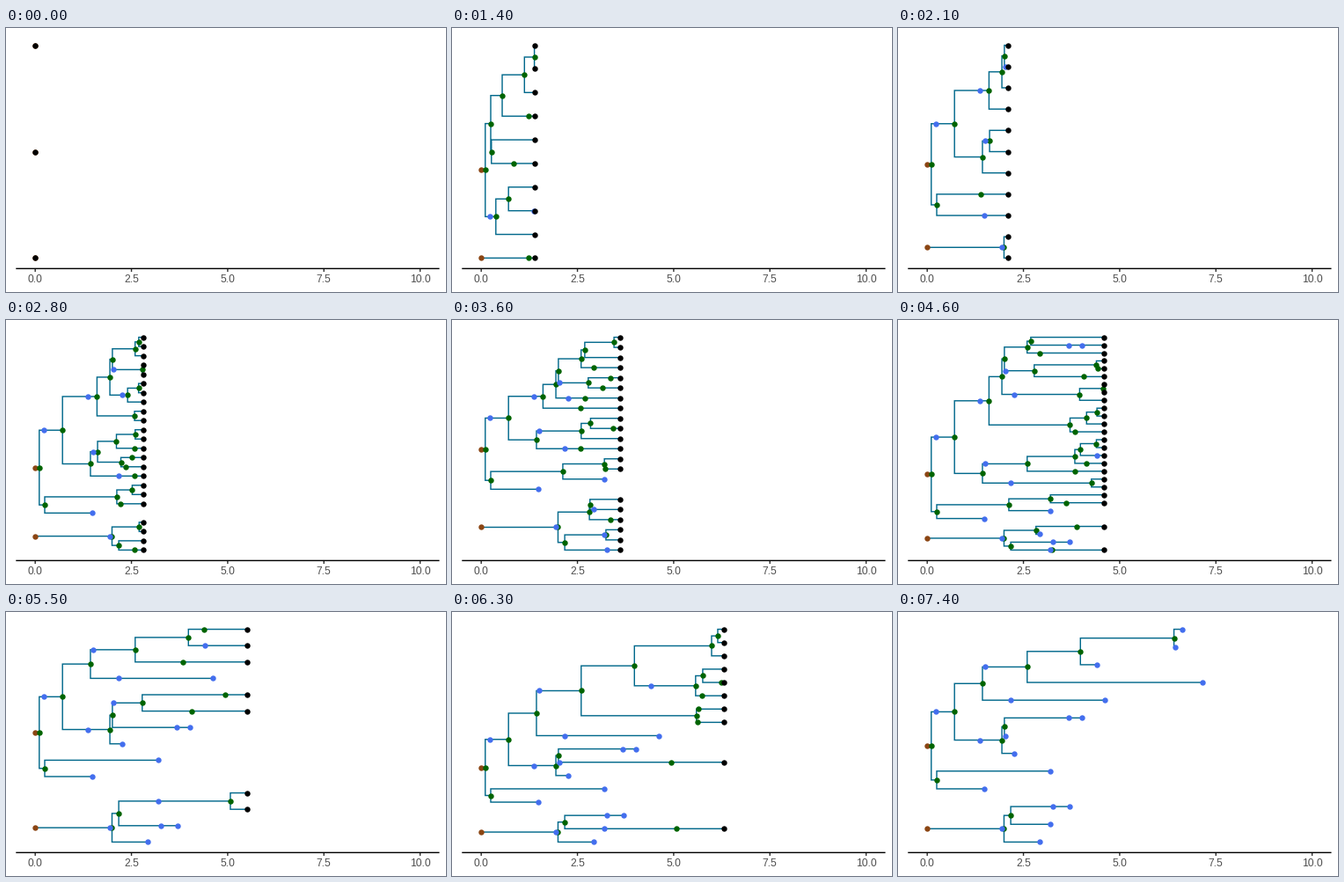
Animation, 500 px wide and 300 px high, one loop 8 s. Source, as a matplotlib script:

```python
import matplotlib.pyplot as plt
from matplotlib.animation import FuncAnimation

W, H, DPI = 500, 300, 100
PT = 72 / DPI                      # points per pixel
X0, UNIT = 33.2, 43.74             # time axis in pixels
TOP, BOTTOM = 19.6, 261.4          # first and last row
AXIS_Y = 273.4
ROOT, SPLIT, FOSSIL, TIP = "#8B4513", "#006400", "#436EEE", "#000000"
EDGE = "#00688B"


def sp(death, *events):
    """A species: plain numbers are fossils, pairs are (birth, daughter)."""
    pairs = [e if isinstance(e, tuple) else (e, None) for e in events]
    return death, sorted(pairs, key=lambda e: e[0])


# First tree, lower branch
clade_h = sp(3.45, (2.21, sp(2.5)), 3.19)
clade_v = sp(2.2, (0.265, sp(1.9, (0.84, sp(1.2)))), 1.48)
clade_q = sp(5.5, (0.247, clade_v), (0.545, sp(1.9, (1.23, sp(1.35)))),
             (1.123, sp(2.0)), (1.381, sp(1.8)), (2.12, clade_h),
             (2.52, sp(3.0)),
             (3.20, sp(5.2, (3.225, sp(3.5)), (3.603, sp(4.1)))))

# First tree, branch that dominates early
clade_c = sp(5.0, (2.58, sp(3.3)), (3.71, sp(5.2, (3.84, sp(4.2)))),
             (4.14, sp(4.9)), (4.41, sp(5.1)))
clade_d = sp(5.4, 2.26, (2.40, sp(3.2)), (2.685, sp(3.4)),
             (3.96, sp(5.0)), (4.575, sp(5.1)))
clade_e = sp(6.9, 2.03,
             (2.78, sp(5.6, (3.15, sp(3.4)), (4.065, sp(4.5)))),
             (3.345, sp(3.55)), (4.395, sp(5.5, (4.435, sp(4.55)))),
             (4.935, sp(5.5)))
clade_f = sp(5.3, (2.915, sp(3.3)))
clade_g = sp(5.2, (3.45, sp(3.9)), 3.67, 4.01)
clade_x = sp(5.4, 1.37, (1.605, clade_c), (1.94, clade_d), (2.005, clade_e),
             (2.595, clade_f), (2.69, clade_g))

# First tree, branch that lasts longest
clade_z = sp(5.1, 2.16, (2.585, sp(2.75)), (4.265, sp(5.0)), 4.614)
clade_w = sp(3.3, (2.225, sp(3.1, (2.36, sp(2.6)))), (2.51, sp(2.7)))
clade_t = sp(7.34, (3.825, sp(4.3)), (5.59, sp(6.7, (5.63, sp(5.9)))),
             (5.635, sp(6.0)), 7.15)
clade_s = sp(6.75, 4.41, (5.57, sp(6.6, (5.73, sp(6.1)))),
             (5.755, sp(6.5, (6.245, sp(6.28)))))
first = sp(6.9, (0.105, clade_q), 0.231, (0.38, sp(2.0)), (0.709, clade_x),
           (1.435, clade_z), 1.505, (1.62, clade_w),
           (2.11, sp(3.2, (2.58, sp(2.7)))), (2.597, clade_t),
           (2.84, sp(3.75, (3.435, sp(3.55)))),
           (3.835, sp(5.0, (4.13, sp(4.4)))), (3.98, clade_s),
           (4.395, sp(5.3)), (5.985, sp(6.5)), (6.145, sp(6.6)),
           (6.41, sp(6.7, 6.45)), 6.625)

# Second tree, and one lineage that dies without a trace
clade_b2 = sp(6.8, (2.59, sp(2.75)), 3.19, (3.24, sp(4.1)), (5.07, sp(5.9)))
clade_b = sp(4.05, (2.17, clade_b2), 3.275, 3.69)
second = sp(5.2, (1.223, sp(1.36)), 1.95, (1.995, clade_b), (2.70, sp(3.1)),
            (2.81, sp(4.3, (3.36, sp(3.5)))), (2.825, sp(4.25, 2.93)),
            (3.88, sp(4.4)))
third = sp(0.55)


def grow(species, now):
    """Tree seen at a given time, as (time, colour, children) or None."""
    death, events = species
    if not events or events[0][0] > now:
        return (now, TIP, []) if now < death else None
    (time, daughter), rest = events[0], events[1:]
    heir = grow((death, rest), now)
    if daughter is None:
        return time, FOSSIL, [heir] if heir else []
    kids = [k for k in (heir, grow(daughter, now)) if k]
    if len(kids) == 2 or (kids and kids[0][1] == TIP):
        return time, SPLIT, kids
    return kids[0] if kids else None


def size(node):
    return sum(map(size, node[2])) or 1


def ladder(nodes):
    return sorted(nodes, key=size, reverse=True)


def place(node, rows, dots, edges):
    """Lay out a subtree, largest clade on top; return its height."""
    time, colour, kids = node
    x = X0 + UNIT * time
    spots = [(X0 + UNIT * k[0], place(k, rows, dots, edges))
             for k in ladder(kids)]
    y = sum(s[1] for s in spots) / len(spots) if spots else next(rows)
    for kx, ky in spots:
        edges += [(x, y), (x, ky), (kx, ky), (float("nan"),) * 2]
    dots[colour].append((x, y))
    return y


fig = plt.figure(figsize=(W / DPI, H / DPI), dpi=DPI, facecolor="white")
ax = fig.add_axes([0, 0, 1, 1])
ax.set(xlim=(0, W), ylim=(H, 0))
ax.axis("off")

ax.plot([11.3, 492.5], [AXIS_Y] * 2, color="black", lw=1.42 * PT,
        solid_capstyle="butt", snap=False)
for value in (0, 2.5, 5, 7.5, 10):
    x = X0 + UNIT * value
    ax.plot([x, x], [AXIS_Y, AXIS_Y + 3.7], color="#333333", lw=1.42 * PT,
            solid_capstyle="butt", snap=False, zorder=1)
    ax.text(x, 289.2, f"{value:.1f}", ha="center", va="baseline",
            family="Liberation Sans", fontsize=12 * PT, color="#4D4D4D")

edge_line, = ax.plot([], [], color=EDGE, lw=1.42 * PT, snap=False,
                     solid_capstyle="butt", solid_joinstyle="miter", zorder=3)
dot_lines = {
    colour: ax.plot([], [], "o", color=colour, ms=6.4 * PT, mew=0,
                    snap=False, zorder=4 + i)[0]
    for i, colour in enumerate((ROOT, SPLIT, FOSSIL, TIP))
}


def update(i):
    now = min(i, 74) / 10
    dots = {colour: [] for colour in dot_lines}
    edges = []
    crowns = [grow(s, now) for s in (first, third, second)]
    roots = ladder([(0, ROOT, [c]) for c in crowns if c])
    count = sum(map(size, roots))
    step = (BOTTOM - TOP) / (count - 1)
    rows = iter([TOP + step * k for k in range(count)])
    for root in roots:
        place(root, rows, dots, edges)
    edge_line.set_data(*zip(*edges))
    for colour, line in dot_lines.items():
        line.set_data([p[0] for p in dots[colour]],
                      [p[1] for p in dots[colour]])
    return [edge_line, *dot_lines.values()]


anim = FuncAnimation(fig, update, frames=80, interval=100, repeat=True,
                     repeat_delay=0, blit=False)
plt.show()
```
